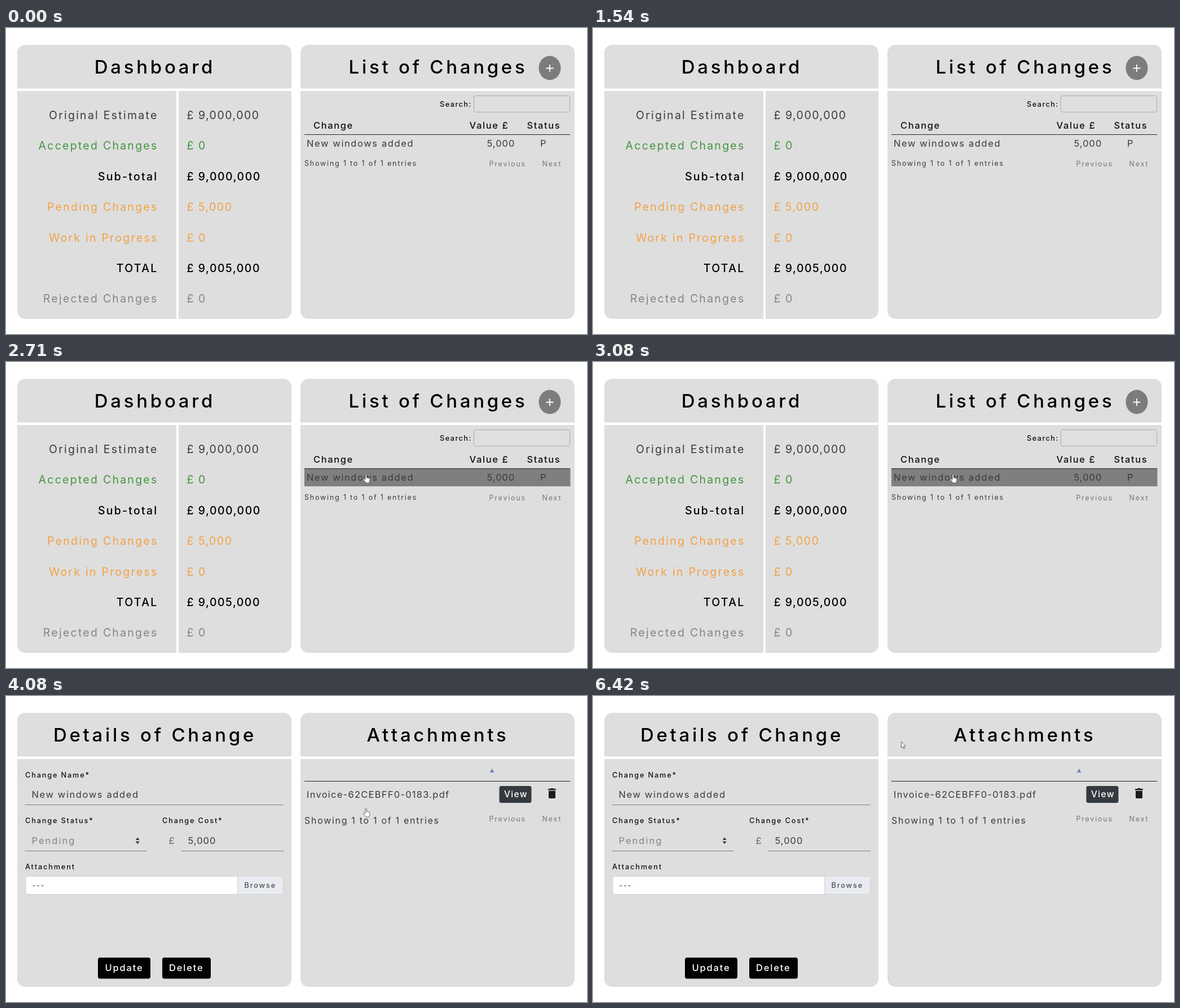
Write an HTML page that moves like this. It is 1030x544 px and loops after 6550 ms.

```html
<!DOCTYPE html>
<html lang="en">
<head>
<meta charset="utf-8">
<title>Change dashboard</title>
<style>
  html, body { margin: 0; width: 100%; height: 100%; overflow: hidden; background: #fff; }
  svg { display: block; }
  text { font: 400 16.5px Inter, "Open Sans", sans-serif; font-optical-sizing: none; letter-spacing: 1.6px; fill: #3a3a3a; }
  .title { font-size: 33px; font-weight: 450; letter-spacing: 4.7px; text-anchor: middle; fill: #000; }
  .name { font-size: 19.5px; letter-spacing: 2.25px; text-anchor: end; }
  .value { font-size: 19.5px; letter-spacing: 1.5px; }
  .strong { font-weight: 500; fill: #000; }
  .green { fill: #43953f; }
  .orange { fill: #f1a142; }
  .muted { fill: #848484; }
  .head { font-weight: 500; fill: #111; }
  .number { letter-spacing: 1px; }
  .small { font-size: 12.5px; letter-spacing: 1.8px; }
  .pager { font-size: 12.5px; letter-spacing: 1.8px; fill: #777; }
  .label { font-size: 12.8px; font-weight: 500; letter-spacing: 1.8px; fill: #111; }
  .button { font-weight: 450; letter-spacing: 1.8px; fill: #fff; }
  .file { letter-spacing: 1.25px; }
  .rule { stroke: #222; }
  .dots { stroke: #222; stroke-dasharray: 1 1; }
</style>
</head>
<body>
<svg width="1030" height="544" viewBox="0 0 1030 544">
  <defs>
    <g id="panel">
      <rect width="486" height="487" rx="14" fill="#dedede"/>
      <rect y="77.5" width="486" height="4.5" fill="#fff"/>
    </g>
    <g id="view">
      <rect width="57" height="30" rx="3.5" fill="#343a40"/>
      <text x="8.5" y="20" class="button" style="font-size:15.5px;letter-spacing:1.3px">View</text>
    </g>
    <path id="bin" d="M0 1h3.500l1-1h5l1 1H14v2.300H0zM1 4.500h12V16q0 2-2 2H3q-2 0-2-2z" fill="#1c1c1f"/>
  </defs>
  <use href="#panel" x="20" y="30"/>
  <use href="#panel" x="522" y="30"/>

  <g id="overview">
    <rect x="302" y="112" width="4" height="405" fill="#fff"/>
    <text x="264" y="81" class="title">Dashboard</text>
    <g id="totals"></g>
    <text x="766" y="81" class="title">List of Changes</text>
    <ellipse cx="964" cy="71" rx="19.5" ry="21.5" fill="#7c7c7c"/>
    <path d="M957.5 71.5h13M964 65v13" stroke="#fff" stroke-width="1.8"/>
    <text x="769" y="139.5" class="label" style="letter-spacing:1.4px">Search:</text>
    <rect x="829.5" y="120.5" width="170" height="29" rx="3" fill="#dfdfdf" stroke="#aaa"/>
    <text x="545" y="178.5" class="head">Change</text>
    <text x="821.5" y="178.5" class="head">Value £</text>
    <text x="923.5" y="178.5" class="head">Status</text>
    <rect id="highlight" x="529" y="190" width="471.5" height="31" fill="#7f7f7f"/>
    <path d="M529 189.5h471" class="rule"/>
    <text x="533" y="211">New windows added</text>
    <text x="852.5" y="211" class="number">5,000</text>
    <text x="947" y="211">P</text>
    <text x="529" y="245" class="small">Showing 1 to 1 of 1 entries</text>
    <text x="856.5" y="245.5" class="pager">Previous</text>
    <text x="950.5" y="245.5" class="pager">Next</text>
  </g>

  <g id="details">
    <text x="264" y="81" class="title">Details of Change</text>
    <text x="34" y="144.5" class="label">Change Name*</text>
    <text x="45.5" y="180.5">New windows added</text>
    <path d="M34 193.5h458M34 275.5h215M311 275.5h181" class="dots"/>
    <text x="34" y="226" class="label">Change Status*</text>
    <text x="277" y="226" class="label">Change Cost*</text>
    <text x="45.5" y="262.5" class="muted" style="letter-spacing:2px">Pending</text>
    <path d="M229.5 256l3.7-4.5 3.7 4.5zM229.5 258.5l3.7 4.5 3.7-4.5z" fill="#343a40"/>
    <text x="288.5" y="262.5" style="fill:#666">£</text>
    <text id="cost" x="322.5" y="262.5" class="number"></text>
    <text x="34" y="307.5" class="label">Attachment</text>
    <rect x="35" y="320.5" width="456.5" height="32" rx="3.5" fill="#fff" stroke="#ced4da"/>
    <path d="M411 321h77q3 0 3 3v25q0 3-3 3h-77z" fill="#e9ebf0"/>
    <path d="M410.5 321v31" stroke="#ced4da"/>
    <text x="46.5" y="341" class="small">---</text>
    <text x="422.5" y="341" class="label" style="fill:#495057">Browse</text>
    <rect x="163" y="465" width="93" height="37.5" rx="4"/>
    <rect x="277" y="465" width="86" height="37.5" rx="4"/>
    <text x="175.5" y="489" class="button">Update</text>
    <text x="289" y="489" class="button">Delete</text>
    <text x="765.5" y="81" class="title">Attachments</text>
  </g>

  <g id="plain">
    <text x="530" y="171" class="file">Invoice-62CEBFF0-0183.pdf</text>
    <use href="#view" x="852" y="150"/>
    <use href="#bin" x="948.5" y="154"/>
  </g>

  <g id="table">
    <path d="M529 151.5h471" class="rule"/>
    <path d="M858 136l3.7-7 3.7 7z" fill="#6c82c4"/>
    <text x="533" y="180.5" class="file">Invoice-62CEBFF0-0183.pdf</text>
    <use href="#view" x="874.5" y="160"/>
    <use href="#bin" x="961" y="164"/>
    <text x="529" y="227" style="font-size:16px;letter-spacing:1.7px">Showing 1 to 1 of 1 entries</text>
    <text x="856.5" y="223" class="pager">Previous</text>
    <text x="950.5" y="223" class="pager">Next</text>
  </g>

  <g id="cursor" fill="#fff" stroke="#555" stroke-width=".9" stroke-linejoin="round">
    <path id="arrow" d="M.5.5V11.5L3 9.3 4.9 13.5 6.6 12.7 4.8 8.7H8.2Z"/>
    <path id="hand" d="M4 10V2a1.2 1.2 0 0 1 2.4 0V6.5L11 7.6q1.4.4 1.2 2L11.6 13 10.5 16H5.5L1 11q-.9-1.4.4-1.9T4 10Z"/>
  </g>
</svg>
<script>
const byId = id => document.getElementById(id);
const show = (id, on) => byId(id).setAttribute("visibility", on ? "visible" : "hidden");
const LOOP = 6550, SELECT = 2710, OPEN = 3960, READY = 4080;

const totals = [
  ["Original Estimate", "9,000,000", ""],
  ["Accepted Changes", "0", "green"],
  ["Sub-total", "9,000,000", "strong"],
  ["Pending Changes", "5,000", "orange"],
  ["Work in Progress", "0", "orange"],
  ["TOTAL", "9,005,000", "strong"],
  ["Rejected Changes", "0", "muted"]
];
byId("totals").innerHTML = totals.map(([name, value, tone], i) => {
  const y = 162 + i * 54.4;
  return `<text x="269.5" y="${y}" class="name ${tone}">${name}</text>
    <text x="320.5" y="${y}" class="value ${tone}">£ ${value}</text>`;
}).join("");

// Pointer stops: time, x, y, shape; each holds until the next
const stops = [
  [2040, 675, 4, "arrow"], [2170, 632, 120, "arrow"], [2290, 631, 150, "arrow"],
  [2420, 632, 178, "arrow"], [2540, 632, 191, "hand"], [2710, 633, 199, "hand"],
  [5130, 632, 205, "hand"], [5250, 615, 165, "arrow"], [5380, 568, 92, "arrow"],
  [5500, 544, 62, "arrow"], [5630, 543, 58, "arrow"], [5750, 548, 66, "arrow"],
  [5880, 548, 72, "arrow"], [6000, 548, 77, "arrow"], [6170, 547, 78, "arrow"],
  [6290, 546, 80, "arrow"], [6420, 546, 80.5, "arrow"]
];

function draw(t) {
  show("overview", t < OPEN);
  show("highlight", t >= SELECT && t < OPEN);
  show("details", t >= OPEN);
  show("plain", t >= OPEN && t < READY);
  show("table", t >= READY);
  byId("cost").textContent = t < READY ? "5,000.0" : "5,000";

  const [, x, y, shape] = stops.findLast(stop => stop[0] <= t) || [0, 0, 0, ""];
  byId("cursor").setAttribute("transform", `translate(${x} ${y})`);
  show("arrow", shape === "arrow");
  show("hand", shape === "hand");
}

const start = performance.now();
function tick() {
  draw((performance.now() - start) % LOOP);
  requestAnimationFrame(tick);
}
tick();
</script>
</body>
</html>
```
